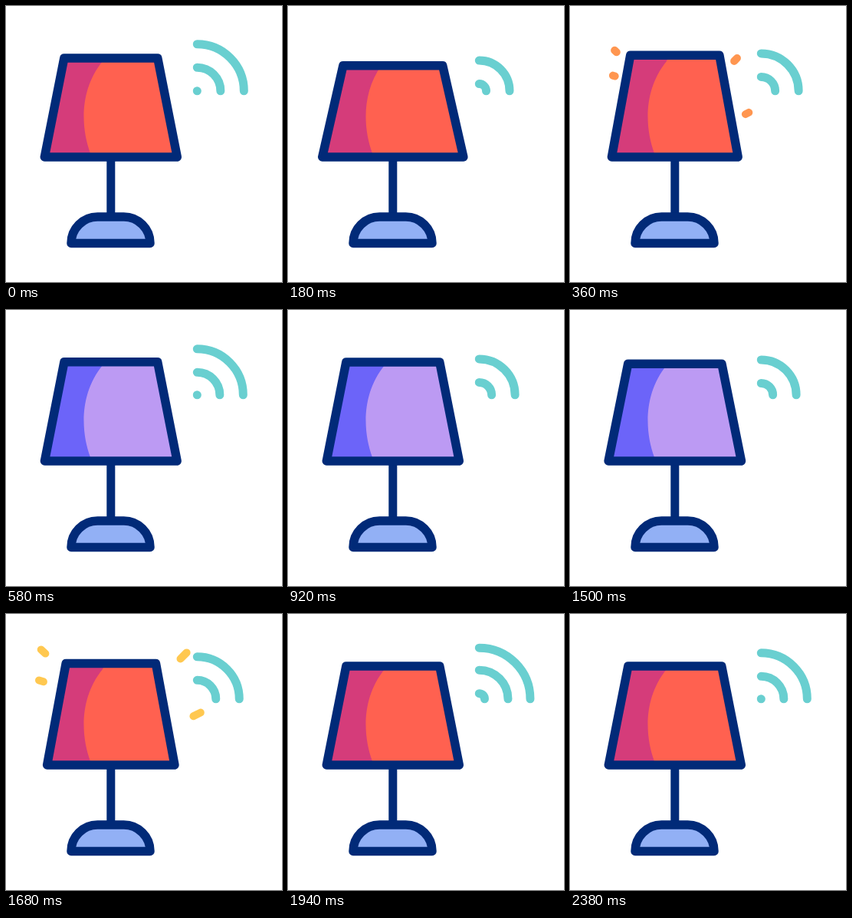
An HTML page with a canvas for the animation above (2.4 s loop, 360 by 360 pixels).

```html
<!DOCTYPE html>
<html>
<head>
<meta charset="utf-8">
<style>
  html, body { margin: 0; height: 100%; overflow: hidden; background: #fff; }
  canvas { display: block; width: 360px; height: 360px; }
</style>
</head>
<body>
<canvas id="stage" width="360" height="360"></canvas>
<script>
const ctx = document.getElementById('stage').getContext('2d');
const LOOP = 2400, PRESS = 1200, WAVE = 600;
const NAVY = '#012a78', TEAL = '#69cfd0';
const RED = [255, 97, 80], MAGENTA = [213, 60, 122], YELLOW = [255, 200, 80];
const LILAC = [188, 154, 243], INDIGO = [108, 100, 249];
// Sparkle paths: start x, y, end x, y
const SPARKLES = [
  [62.7, 62, 45.7, 46.4], [60.7, 92.2, 43, 86.4],
  [211.4, 74.6, 235.6, 50.4], [225.7, 142.7, 253.8, 128.6]
];
const base = new Path2D('M85 309.5A34.5 34.5 0 0 1 119.5 275H153.5A34.5 34.5 0 0 1 188 309.5Z');
const shadow = new Path2D('M0 50H136L126 72C95 110 98 160 110 192L114 204H0Z');

const clamp = x => Math.min(1, Math.max(0, x));
const lerp = (a, b, k) => a + (b - a) * k;
const ease = (t, from, to) => { const k = clamp((t - from) / (to - from)); return k * k * (3 - 2 * k); };
const mix = (a, b, k) => `rgb(${a.map((v, i) => Math.round(lerp(v, b[i], k)))})`;

function stroke(color, width, path) {
  ctx.strokeStyle = color;
  ctx.lineWidth = width;
  path ? ctx.stroke(path) : ctx.stroke();
}

function drawArc(radius, width = 11) {
  ctx.beginPath();
  ctx.arc(249.3, 110.8, Math.max(radius, 0.05), -Math.PI / 2, 0);
  stroke(TEAL, width);
}

function drawWaves(t) {
  const p = t % WAVE, r = 30.5 * p / WAVE;
  drawArc(r);
  drawArc(r + 30.5);
  if (p < 160) drawArc(61 + p * 0.04);
  if (p > 500) drawArc(0, 11 * clamp((p - 500) / 80));
}

function drawSparkles(t) {
  if (t <= 320 || t >= 540) return;
  const head = ease(t, 320, 440), tail = ((t - 320) / 220) ** 1.3;
  const color = mix(RED, YELLOW, clamp((t - 320) / 80));
  for (const [x0, y0, x1, y1] of SPARKLES) {
    ctx.beginPath();
    ctx.moveTo(lerp(x0, x1, tail), lerp(y0, y1, tail));
    ctx.lineTo(lerp(x0, x1, head), lerp(y0, y1, head));
    stroke(color, 10);
  }
}

function shadePath(t) {
  const squash = ease(t, 0, 200) - ease(t, 200, 400);
  const stretch = ease(t, 200, 400) - ease(t, 400, 600);
  const sx = 1 + 0.066 * squash - 0.06 * stretch;
  const top = 68 + 10 * squash - 5.3 * stretch;
  const path = new Path2D();
  [[-61, top], [61, top], [86.5, 197], [-86.5, 197]].forEach(([x, y]) => path.lineTo(136.8 + x * sx, y));
  path.closePath();
  return path;
}

function drawLamp(t, toLilac) {
  const fade = ease(t, 370, 460), lilac = toLilac ? fade : 1 - fade;
  const shade = shadePath(t);
  ctx.beginPath();
  ctx.moveTo(136.8, 197);
  ctx.lineTo(136.8, 275);
  stroke(NAVY, 11);
  ctx.fillStyle = '#92b0f5';
  ctx.fill(base);
  stroke(NAVY, 11.5, base);

  ctx.save();
  ctx.clip(shade);
  ctx.fillStyle = mix(RED, LILAC, lilac);
  ctx.fillRect(0, 0, 360, 360);
  ctx.fillStyle = mix(MAGENTA, INDIGO, lilac);
  ctx.fill(shadow);
  ctx.restore();
  stroke(NAVY, 11.5, shade);
}

function draw(now) {
  const t = now % LOOP, press = t % PRESS;
  ctx.fillStyle = '#fff';
  ctx.fillRect(0, 0, 360, 360);
  ctx.lineCap = ctx.lineJoin = 'round';
  drawSparkles(press);
  drawLamp(press, t < PRESS);
  drawWaves(t);
}

const start = performance.now();
function tick() {
  draw(performance.now() - start);
  requestAnimationFrame(tick);
}
tick();
</script>
</body>
</html>
```
